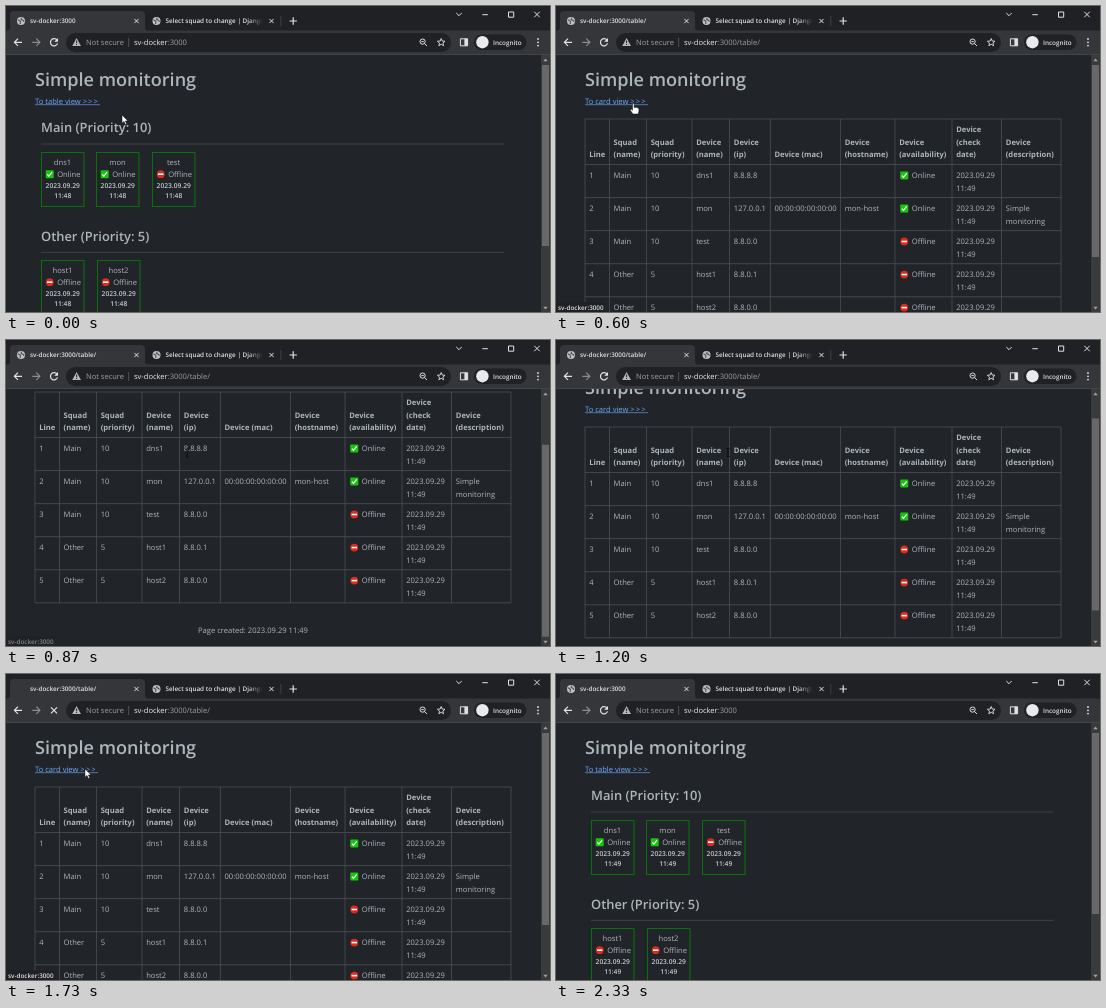
Recreate the animation shown at these times as an HTML page. Size 544x306 px, loop 2.39 s.

```html
<!DOCTYPE html>
<html lang="en">
<head>
<meta charset="utf-8">
<title>Simple monitoring</title>
<style>
  html, body { margin: 0; width: 100%; height: 100%; overflow: hidden; background: #212529; }
  svg { display: block; width: 100vw; height: 100vh; }
  text { font-family: "Open Sans", "Noto Sans", sans-serif; font-size: 7.6px; fill: #adb5bd;
         text-rendering: geometricPrecision; white-space: pre; }
  .ui { font-size: 6.35px; font-weight: 600; fill: #dfe1e5; }
  .url { font-size: 7.54px; fill: #e8eaed; }
  .dim { fill: #9aa0a6; }
  .h1 { font-size: 18.1px; font-weight: 600; }
  .h2 { font-size: 12.9px; font-weight: 600; }
  .th { font-weight: 700; }
  .link { fill: #6ea8fe; }
  .more { letter-spacing: 1.1px; }
  .when { font-size: 6.7px; font-weight: 600; fill: #c6ccd2; }
  .mid { text-anchor: middle; }
  .ico { fill: none; stroke: #dfe1e5; stroke-width: 1; }
</style>
</head>
<body>
<svg id="stage" viewBox="0 0 544 306" preserveAspectRatio="none">
  <defs>
    <clipPath id="view"><rect y="49" width="535" height="257"/></clipPath>
    <linearGradient id="fade"><stop offset="0" stop-color="#202124" stop-opacity="0"/><stop offset="1" stop-color="#202124"/></linearGradient>
  </defs>
</svg>
<script>
const stage = document.getElementById('stage');
const FRAME = '#202124';

function add(parent, tag, attrs = {}, content = '') {
  const node = document.createElementNS('http://www.w3.org/2000/svg', tag);
  for (const key in attrs) node.setAttribute(key, attrs[key]);
  node.textContent = content;
  return parent.appendChild(node);
}
const group = (parent, attrs) => add(parent, 'g', attrs);
const rect = (parent, x, y, width, height, fill, rx = 0) =>
  add(parent, 'rect', { x, y, width, height, fill, rx });
const text = (parent, x, y, str, cls = '') => add(parent, 'text', { x, y, class: cls }, str);
const icon = (parent, d, style = '') => add(parent, 'path', { d, class: 'ico', style });
const show = (node, on) => { node.style.display = on ? '' : 'none'; };
const cross = (x, y, r) => `M${x - r} ${y - r}l${2 * r} ${2 * r}m0 ${-2 * r}l${-2 * r} ${2 * r}`;

function globe(x, y) {
  const g = group(stage, { transform: `translate(${x} ${y})` });
  add(g, 'circle', { r: 4, fill: '#bdc1c6' });
  add(g, 'path', { d: 'M-3 -1.2L-.6 .4 -.8 3M.4 -3.2L.2 -1.4 2 -.8 3 .8', fill: 'none', stroke: '#4b4d51', 'stroke-width': 1.1 });
  return g;
}

// Status mark and its label
function state(parent, x, y, online) {
  const g = group(parent, { transform: `translate(${x} ${y})` });
  if (online) {
    rect(g, -4, -4, 8, 8, '#16c60c', .8);
    icon(g, 'M-2.4 .2L-.8 1.9 2.4 -2', 'stroke:#fff;stroke-width:1.3');
  } else {
    add(g, 'circle', { r: 3.9, fill: '#dc2a1c' });
    rect(g, -2.7, -.8, 5.4, 1.6, '#fff');
  }
  text(g, 7.5, 2.7, online ? 'Online' : 'Offline');
}

// Page
const page = group(stage, { 'clip-path': 'url(#view)' });
rect(page, 0, 49, 535, 257, '#212529');
const scroller = group(page);

function makeView(linkText, linkEnd) {
  const g = group(scroller);
  text(g, 29, 80.3, 'Simple monitoring', 'h1');
  const link = text(g, 29, 97.5, linkText + ' ', 'link');
  add(link, 'tspan', { class: 'more' }, '>>>');
  rect(g, 29, 98.5, linkEnd - 29, .6, '#6ea8fe');
  return g;
}

const cards = makeView('To table view', 94);
const clocks = [];
function card(x, y, name, online) {
  const g = group(cards, { transform: `translate(${x} ${y})` });
  add(g, 'rect', { x: .5, y: -.5, width: 42.5, height: 54, fill: 'none', stroke: '#07720a' });
  text(g, 21.5, 11.6, name, 'mid');
  state(g, 8.7, 21.2, online);
  text(g, 21.7, 35.3, '2023.09.29', 'when mid');
  clocks.push(text(g, 21.7, 44.7, '', 'when mid'));
}
[['Main (Priority: 10)', 0], ['Other (Priority: 5)', 108.3]].forEach(([title, dy]) => {
  text(cards, 35, 126.4 + dy, title, 'h2');
  rect(cards, 35, 137.6 + dy, 463, .8, '#43484d');
});
card(35, 147, 'dns1', true);
card(90, 147, 'mon', true);
card(146, 147, 'test', false);
card(35, 255, 'host1', false);
card(91, 255, 'host2', false);

const table = makeView('To card view', 92);
const cols = [29, 53.4, 90.5, 136, 173.6, 214.3, 284.5, 339, 396, 445.6, 505];
const heads = ['Line', 'Squad|(name)', 'Squad|(priority)', 'Device|(name)', 'Device|(ip)', 'Device (mac)',
  'Device|(hostname)', 'Device|(availability)', 'Device|(check|date)', 'Device|(description)'];
const rows = [
  ['Main', '10', 'dns1', '8.8.8.8', '', '', true, ''],
  ['Main', '10', 'mon', '127.0.0.1', '00:00:00:00:00:00', 'mon-host', true, 'Simple|monitoring'],
  ['Main', '10', 'test', '8.8.0.0', '', '', false, ''],
  ['Other', '5', 'host1', '8.8.0.1', '', '', false, ''],
  ['Other', '5', 'host2', '8.8.0.0', '', '', false, ''],
];
const rowH = 33.05, bodyTop = 158.6, lineH = 12.4;
const tableEnd = bodyTop + rowH * rows.length;
const lines = (x, y, str, cls) =>
  str.split('|').forEach((s, i) => s && text(table, x, y + i * lineH, s, cls));

cols.forEach(x => rect(table, x - .4, 113, .8, tableEnd - 113, '#4a4f53'));
[113, ...Array.from({ length: 6 }, (_, i) => bodyTop + i * rowH)]
  .forEach(y => rect(table, 29, y - .4, 476, .8, '#4a4f53'));
heads.forEach((h, i) => lines(cols[i] + 4.2, 151 - (h.split('|').length - 1) * lineH, h, 'th'));
rows.forEach((row, r) => {
  const y = bodyTop + 13.5 + r * rowH;
  const cells = [String(r + 1), ...row.slice(0, 7), '2023.09.29|11:49', row[7]];
  cells.forEach((c, i) => {
    if (typeof c === 'boolean') state(table, cols[i] + 9.3, y - 2.7, c);
    else lines(cols[i] + 4.2, y, c);
  });
});
text(table, 192, 353.6, 'Page created: 2023.09.29 11:49');

// Scrollbar
rect(stage, 535, 49, 9, 257, '#393a3b');
const thumb = rect(stage, 536, 59, 7, 181, '#686868');
add(stage, 'path', { d: 'M537.3 55.2h4.4l-2.2 -2.6zM537.3 300.8h4.4l-2.2 2.6z', fill: '#a0a2a4' });

// Tab strip
rect(stage, 0, 0, 544, 25, FRAME);
add(stage, 'path', { d: 'M0 25Q4 25 4 21V9Q4 5 8 5H135Q139 5 139 9V21Q139 25 143 25Z', fill: '#35363a' });
const favicon = globe(15, 15);
const tabTitle = text(stage, 24, 17.3, '', 'ui');
icon(stage, cross(130.5, 15, 2.1));
globe(150.5, 15);
text(stage, 159.5, 17.3, 'Select squad to change | Django', 'ui');
rect(stage, 242, 8, 15, 14, 'url(#fade)');
rect(stage, 257, 8, 4, 14, FRAME);
icon(stage, cross(265.5, 15, 2.1));
rect(stage, 274.5, 10, .7, 10, '#4a4c50');
icon(stage, 'M283.5 15h7.4M287.2 11.3v7.4', 'stroke-width:1.2');
icon(stage, 'M450.3 7L453 9.7 455.7 7');
icon(stage, 'M476.3 8.7h5.6M502.5 6h5.2v5.2h-5.2z');
icon(stage, cross(531, 8.5, 2.7));

// Toolbar
rect(stage, 0, 24.5, 544, 24, '#35363a');
rect(stage, 0, 48.2, 544, .8, '#4a4b4f');
icon(stage, 'M16 36.3H8.6M12 32.7L8.4 36.3 12 39.9', 'stroke-width:1.2');
icon(stage, 'M26.3 36.3H33.7M30.3 32.7L33.9 36.3 30.3 39.9', 'stroke:#8a8d91;stroke-width:1.2');
const reload = group(stage);
icon(reload, 'M51 34.2A3.6 3.6 0 1 0 51.5 37.4', 'stroke-width:1.2');
add(reload, 'path', { d: 'M52 32V35.8H48.2Z', fill: '#dfe1e5' });
const stop = icon(stage, cross(48, 36.3, 3), 'stroke-width:1.2');
rect(stage, 60, 27, 385, 19, FRAME, 9.5);
add(stage, 'path', { d: 'M70.6 32L75 40H66.2Z', fill: '#b4b8bc' });
rect(stage, 70.1, 34.6, 1, 2.6, FRAME);
rect(stage, 70.1, 38, 1, 1, FRAME);
text(stage, 80, 38.9, 'Not secure', 'url dim');
rect(stage, 122.4, 32, .7, 9, '#5f6368');
const host = text(stage, 128, 38.9, 'sv-docker', 'url');
const path = add(host, 'tspan', { class: 'dim' });
add(stage, 'circle', { cx: 416.6, cy: 35.6, r: 2.6, class: 'ico' });
icon(stage, 'M418.5 37.5L421 40M415.4 35.6h2.4');
const star = Array.from({ length: 10 }, (_, i) => {
  const r = i % 2 ? 1.8 : 4, a = i * Math.PI / 5;
  return `${435.2 + r * Math.sin(a)},${36.5 - r * Math.cos(a)}`;
}).join(' ');
add(stage, 'polygon', { points: star, class: 'ico', style: 'stroke-width:.9' });
icon(stage, 'M454.4 32.8h7.2v7h-7.2z');
rect(stage, 458.4, 32.8, 3.2, 7, '#dfe1e5');
rect(stage, 468, 28.5, 52.5, 15.5, FRAME, 7.7);
add(stage, 'circle', { cx: 476.4, cy: 36.2, r: 6.2, fill: '#e8eaed' });
text(stage, 487, 38.6, 'Incognito', 'ui');
[33, 36.3, 39.6].forEach(cy => add(stage, 'circle', { cx: 532, cy, r: .9, fill: '#dfe1e5' }));

// Link preview
const preview = group(stage);
const previewBox = rect(preview, -3, 296, 52, 13, FRAME, 2);
const previewText = text(preview, 2, 303.8, '', 'ui');

// Pointer shapes
const body = { fill: '#fff', stroke: '#111', 'stroke-width': .5 };
const pointer = group(stage);
const shapes = {
  arrow: add(pointer, 'path', { d: 'M0 0V8.2L2 6.4 3.4 9.6 4.8 9 3.4 5.9H6Z', ...body }),
  hand: add(pointer, 'path', { d: 'M0 .8Q.8 -.4 1.6 .8V4.4Q4.6 4.2 6 5.2 6.6 5.6 6.4 8L5.6 11H.4L-2 7.4Q-2.4 6 -1.2 6.2L0 7.2Z', ...body }),
  beam: icon(pointer, 'M-1.5 -4H1.5M0 -4V4M-1.5 4H1.5', 'stroke:#08090a;stroke-width:.8'),
};

// Motion tables: [step, values...]
const LOOP = 2390, STEP = 200 / 3;
const moves = [[0, 116, 109], [3, 78, 97], [9, 76.5, 97], [10, 100, 101], [12, 181, 113], [17, 181, 113],
  [20, 154, 112], [23, 79, 96], [26, 79, 95], [29, 79, 95], [34, 280, 200]];
const scrolls = [[0, 0], [10, 0], [11, 15], [12, 47], [13, 61], [16, 61], [17, 49], [18, 26], [19, 7], [20, 0]];
const pointers = [[0, 'arrow'], [3, 'hand'], [6, 'arrow'], [8, 'hand'], [10, 'arrow'], [12, 'beam'], [19, 'arrow'],
  [23, 'hand'], [26, 'arrow'], [33, 'none']];
const previews = [[0, 0], [3, 0], [4, 1], [12, 1], [13, .5], [14, 0], [24, 0], [25, 1], [28, 1], [30, 0]];

const held = (keys, k) => keys.filter(key => key[0] <= k).pop();
function tween(keys, k, i = 1) {
  const a = held(keys, k), b = keys.find(key => key[0] > k);
  return b ? a[i] + (b[i] - a[i]) * (k - a[0]) / (b[0] - a[0]) : a[i];
}

function draw(time) {
  const k = Math.min(35, Math.floor((time % LOOP + 4) / STEP));
  const onTable = k >= 8 && k < 28;
  const loading = k === 6 || k === 7 || k === 26 || k === 27;

  show(cards, !onTable);
  show(table, onTable);
  show(favicon, !loading);
  show(reload, !loading);
  show(stop, loading);
  path.textContent = onTable ? ':3000/table/' : ':3000';
  tabTitle.textContent = 'sv-docker' + path.textContent;
  clocks.forEach(c => { c.textContent = k < 8 ? '11:48' : '11:49'; });

  const top = tween(scrolls, k);
  scroller.setAttribute('transform', `translate(0 ${-top})`);
  thumb.setAttribute('y', 59 + top * .75);
  thumb.setAttribute('height', onTable ? 192 : 181);

  const toTable = k < 8;
  previewText.textContent = toTable ? 'sv-docker:3000/table/' : 'sv-docker:3000';
  previewBox.setAttribute('width', toTable ? 74 : 52);
  preview.style.opacity = tween(previews, k);

  const kind = held(pointers, k)[1];
  for (const name in shapes) show(shapes[name], name === kind);
  pointer.setAttribute('transform', `translate(${tween(moves, k)} ${tween(moves, k, 2)})`);
}

const start = performance.now();
function tick() {
  draw(performance.now() - start);
  requestAnimationFrame(tick);
}
tick();
</script>
</body>
</html>
```
